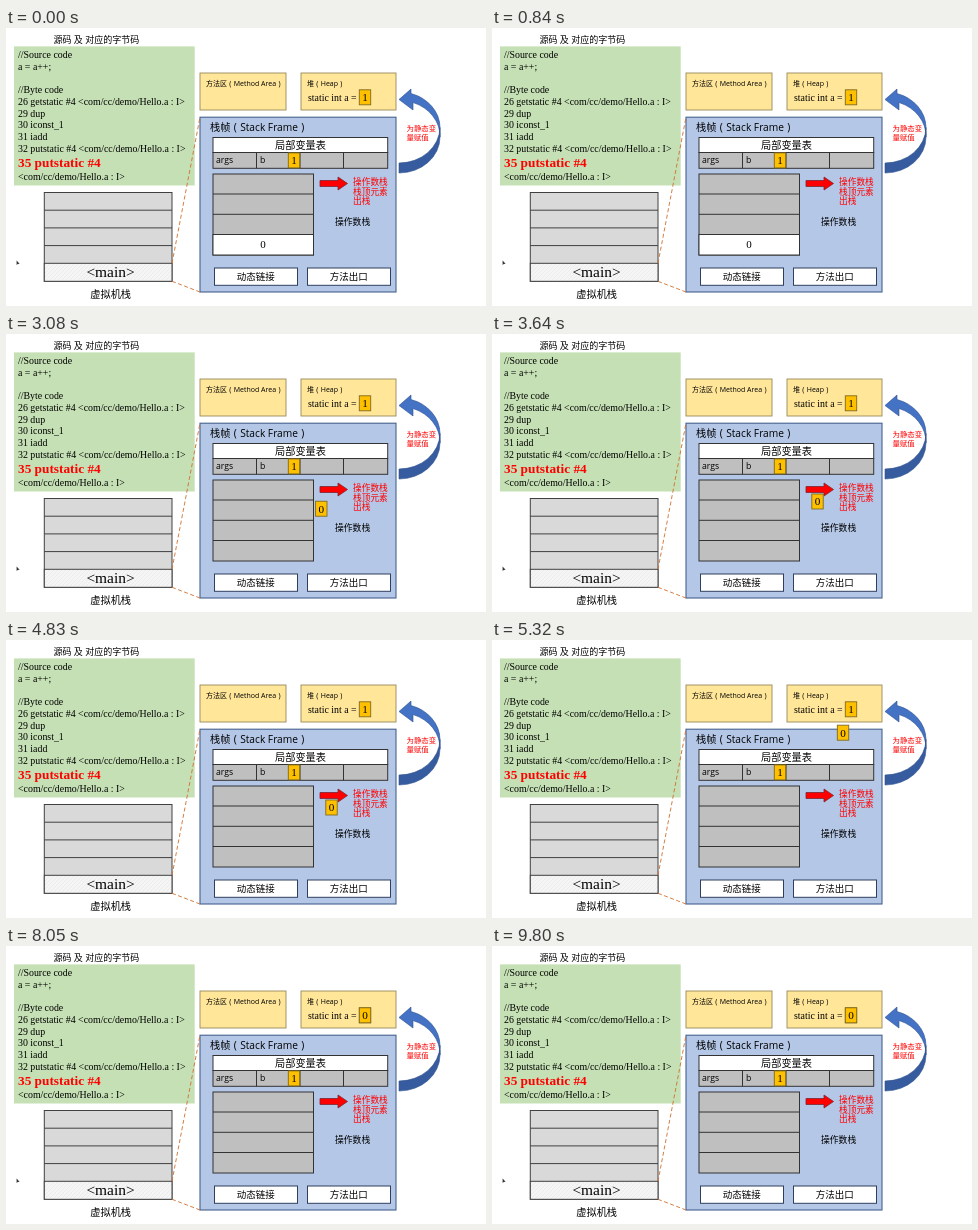
Write an HTML page that moves like this. It is 480 px wide and 278 px high and loops after 9940 ms.

```html
<!DOCTYPE html>
<html lang="zh-CN">
<head>
<meta charset="utf-8">
<title>Stack frame</title>
<style>
  html, body { margin: 0; width: 100%; height: 100%; overflow: hidden; background: #fff; }
  svg { display: block; width: 100vw; height: 100vh; }
  text { font-family: "Open Sans", "Noto Sans CJK SC", "Noto Sans CJK", sans-serif; white-space: pre; }
  .serif { font-family: "Liberation Serif", "Times New Roman", serif; }
  .mid { text-anchor: middle; }
  .red { fill: #f00; }
</style>
</head>
<body>
<svg id="stage" viewBox="0 0 480 278"></svg>
<script>
const LOOP = 9940, STEP = 70, MOVE = 980;
const POP = 2520, STORE = 4830;
const CURSOR_OFF = 3990, CURSOR_ON = 7420;
const CELL = [257, 216], BESIDE = [325.5, 167.5], HEAP = [359, 69.3];

const stage = document.getElementById('stage');

function add(tag, attrs, parent = stage) {
  const node = document.createElementNS('http://www.w3.org/2000/svg', tag);
  for (const key in attrs) node.setAttribute(key, attrs[key]);
  parent.appendChild(node);
  return node;
}

// Boxes are given by their edges: left, top, right, bottom.
function box(l, t, r, b, fill, stroke = 'none', weight = 1, parent = stage) {
  return add('rect', { x: l, y: t, width: r - l, height: b - t, fill, stroke, 'stroke-width': weight }, parent);
}

function line(x1, y1, x2, y2, stroke, extra = {}) {
  return add('line', { x1, y1, x2, y2, stroke, ...extra });
}

function text(x, y, size, content, cls = '', parent = stage) {
  const node = add('text', { x, y, 'font-size': size, class: cls }, parent);
  node.textContent = content;
  return node;
}

// Parentheses centred in their own full-width cells.
function inParens(name, gloss) {
  return `${name}\u2004(\u2004${gloss}\u2004)`;
}

function chip(x, y, digit) {
  const group = add('g', { transform: `translate(${x} ${y})` });
  box(-5.7, -7.5, 5.7, 7.5, '#ffc000', '#7f6a20', 0.9, group);
  text(0, 3.8, 11.2, digit, 'serif mid', group);
  return group;
}

function drawCode() {
  text(47.5, 15.3, 9, '源码 及 对应的字节码');
  box(8, 18.4, 188.7, 157.5, '#c5e0b4');
  const lines = [
    '//Source code', 'a = a++;', '', '//Byte code',
    '26 getstatic #4 <com/cc/demo/Hello.a : I>',
    '29 dup', '30 iconst_1', '31 iadd',
    '32 putstatic #4 <com/cc/demo/Hello.a : I>'
  ];
  lines.forEach((s, i) => text(12, 30.1 + i * 11.7, 9.9, s, 'serif'));
  text(12, 138.7, 13.3, '35 putstatic #4', 'serif red').setAttribute('font-weight', 700);
  text(12, 152, 9.9, '<com/cc/demo/Hello.a : I>', 'serif');
}

function drawCallStack() {
  const ink = '#404040';
  const [l, r, bottom] = [38.3, 166, 253.3];
  box(l, 164.5, r, bottom, '#d9d9d9', ink);
  const hatch = add('pattern', { id: 'hatch', width: 4, height: 4, patternUnits: 'userSpaceOnUse' });
  box(0, 0, 4, 4, '#f5f5f5', 'none', 1, hatch);
  add('path', { d: 'M0 4L4 0', stroke: '#e8e8e8', 'stroke-width': 0.7 }, hatch);
  box(l, 235.3, r, bottom, 'url(#hatch)', ink);
  for (const y of [182.2, 199.9, 217.6]) line(l, y, r, y, ink);
  text(104.5, 248.5, 15.4, '<main>', 'serif mid');
  text(104.7, 269.6, 10.2, '虚拟机栈', 'mid');
}

function drawAreas() {
  for (const [l, r] of [[194, 280], [295, 390]]) box(l, 45, r, 82, '#ffe699', '#978a5c', 0.9);
  text(200, 58, 7, inParens('方法区', 'Method Area'));
  text(301, 58, 7, inParens('堆', 'Heap'));
  text(302, 73, 9.9, 'static int a =', 'serif');
}

function drawFrame() {
  const ink = '#333';
  box(194, 89.2, 390, 264, '#b4c7e7', '#44618f', 1.1);
  text(204, 103, 10.2, inParens('栈帧', 'Stack Frame'));

  box(207, 109.5, 381.7, 124.5, '#fff', ink);
  box(207, 124.5, 381.7, 140.3, '#bfbfbf', ink);
  for (const x of [250.5, 294, 337.5]) line(x, 124.5, x, 140.3, ink);
  text(294.5, 120.7, 10.2, '局部变量表', 'mid');
  text(210, 135.3, 8.7, 'args');
  text(254, 135.3, 8.7, 'b');

  box(207, 146, 307.5, 227, '#bfbfbf', ink);
  const cell = box(207, 206.5, 307.5, 227, '#fff', ink);
  for (const y of [166, 186.3, 206.5]) line(207, y, 307.5, y, ink);

  add('path', {
    d: 'M314 152.5H332V149L341.5 155.5L332 162V158.5H314Z',
    fill: '#f00', stroke: '#7b2633', 'stroke-width': 0.8
  });
  ['操作数栈', '栈顶元素', '出栈'].forEach((s, i) => text(347, 157.1 + i * 9.5, 8.7, s, 'red'));
  text(329, 196.5, 8.8, '操作数栈');

  for (const [l, label] of [[208.5, '动态链接'], [301.5, '方法出口']]) {
    box(l, 240, l + 83, 257.3, '#fff', '#2f3f5f');
    text(l + 41.3, 252, 9.5, label, 'mid');
  }
  return cell;
}

function drawLinks() {
  const dash = { 'stroke-dasharray': '4 2.5', 'stroke-width': 0.9 };
  line(166, 235.3, 194, 89.2, '#d0702f', dash);
  line(166, 253.3, 194, 264, '#d0702f', dash);
  const edge = { stroke: '#2f528f', 'stroke-width': 0.6, 'stroke-linejoin': 'round' };
  add('path', { d: 'M434 109A41 36 0 0 0 407 74.5V82L393 71.5L405 61V65.5A41 36 0 0 1 434 99.5Z', fill: '#4472c4', ...edge });
  add('path', { d: 'M393 135A41 36 0 0 0 434 99.5V109A41 36 0 0 1 393 145Z', fill: '#365b9f', ...edge });
  text(400.5, 102.8, 7.4, '为静态变', 'red');
  text(400.5, 112.2, 7.4, '量赋值', 'red');
}

drawCode();
drawCallStack();
drawAreas();
const cell = drawFrame();
drawLinks();
chip(288, 132.4, '1');
chip(...HEAP, '1');
const cellDigit = text(CELL[0], 219.8, 11, '0', 'serif mid');
const moving = chip(...CELL, '0');
const cursor = add('path', { d: 'M10.6 232.5V237L11.8 236L13.6 235.8Z', fill: '#333' });

// Short pick-up, long settling.
function ease(t, start) {
  const p = Math.min(1, Math.max(0, (t - start) / MOVE));
  return 1 - (1 - p ** 1.7) ** 3.9;
}

function show(node, visible) {
  node.setAttribute('visibility', visible ? 'visible' : 'hidden');
}

function render(ms) {
  const t = Math.floor((ms % LOOP) / STEP) * STEP;
  const popped = t >= POP;
  show(cell, !popped);
  show(cellDigit, !popped);
  show(moving, popped);
  show(cursor, t < CURSOR_OFF || t >= CURSOR_ON);
  const out = ease(t, POP), up = ease(t, STORE);
  const [x, y] = [0, 1].map(i =>
    CELL[i] + (BESIDE[i] - CELL[i]) * out + (HEAP[i] - BESIDE[i]) * up);
  moving.setAttribute('transform', `translate(${x.toFixed(2)} ${y.toFixed(2)})`);
}

const begin = performance.now();
function tick() {
  render(performance.now() - begin);
  requestAnimationFrame(tick);
}
tick();
</script>
</body>
</html>
```
